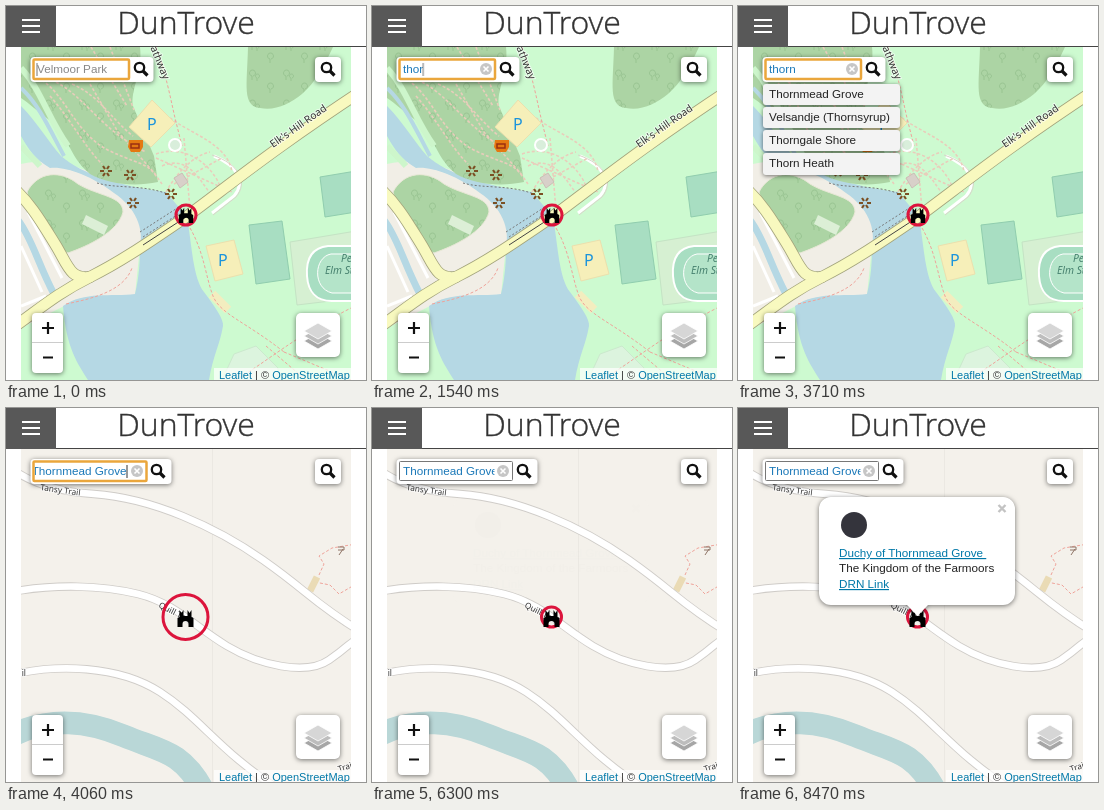
Recreate the animation shown at these times as an HTML page. Size 360 px wide and 374 px high, loop 9.1 s.

```html
<!DOCTYPE html>
<html lang="en">
<head>
<meta charset="utf-8">
<title>Map search</title>
<style>
html, body { margin: 0; width: 100%; height: 100%; overflow: hidden; background: #fff; }
svg { display: block; }
text { font: 11.7px "Liberation Sans", Arial, sans-serif; fill: #222; white-space: pre; }
.title { font: 300 32px "Open Sans", sans-serif; fill: #333; stroke: #333; stroke-width: .4px; }
.label { font: 10.3px "Noto Sans", sans-serif; fill: #333; stroke: #fff; stroke-opacity: .6; stroke-width: 2px; paint-order: stroke; }
.small { font-size: 8.3px; }
.sport { font-style: italic; fill: #46806e; stroke: none; }
.park { font: 16px "Noto Sans", sans-serif; fill: #1b94dc; }
.query { fill: #1a78b8; }
.hint { fill: #888; }
.link { fill: #0078a8; }
.popup .link { text-decoration: underline; }
.credit { font-size: 11px; fill: #333; }
.path, .trail { fill: none; stroke-dasharray: 3 2; }
.path { stroke: #efa39a; }
.trail { stroke: #e9cdbb; stroke-width: 1.6; }
.casing, .road { fill: none; stroke-linecap: round; }
.yellow .casing { stroke: #a3a47c; stroke-width: 12; }
.yellow .road { stroke: #f8f9bf; stroke-width: 10.4; }
.white .casing { stroke: #cfccc8; stroke-width: 8.4; }
.white .road { stroke: #fff; stroke-width: 6.6; }
.box { fill: #fff; filter: drop-shadow(0 1px 2.5px #0008); }
.focus { fill: #fff; stroke: #eaa63c; stroke-width: 2.5; }
.plain { fill: #fff; stroke: #777; }
.ring { fill: none; stroke: #dc143c; stroke-width: 3; }

/* One loop is 9.1 s, so 1% is 91 ms. */
.old, .found, .typing, .choosing, .done, .hint, .cancel, .list, .caret, .cover, .pulse {
  animation: 9.1s step-end infinite;
}
.old, .typing { animation-name: before; }
.found { animation-name: after; }
.choosing { animation-name: chosen; }
.done { animation-name: blurred; }
.hint { animation-name: hint; }
.cancel { animation-name: cancel; }
.list { animation-name: list; }
.caret { animation-name: blink; }
.cover { animation-name: type; }
.pulse { animation-name: pulse; }
.popup { animation: popup 9.1s linear infinite; }

@keyframes before { 0% { opacity: 1 } 42.308%, 100% { opacity: 0 } }
@keyframes after { 0% { opacity: 0 } 42.308%, 100% { opacity: 1 } }
@keyframes chosen { 0% { opacity: 0 } 42.308% { opacity: 1 } 69.231%, 100% { opacity: 0 } }
@keyframes blurred { 0% { opacity: 0 } 69.231%, 100% { opacity: 1 } }
@keyframes hint { 0% { opacity: 1 } 10%, 100% { opacity: 0 } }
@keyframes cancel { 0% { opacity: 0 } 10%, 100% { opacity: 1 } }
@keyframes list { 0% { opacity: 0 } 23.077%, 100% { opacity: 1 } }
@keyframes type {
  0% { transform: translateX(0) }
  10% { transform: translateX(3.3px) }
  12.308% { transform: translateX(9.8px) }
  13.846% { transform: translateX(16.3px) }
  16.154% { transform: translateX(20.2px) }
  18.462%, 100% { transform: translateX(26.7px) }
}
@keyframes blink {
  0%, 9.231%, 29.451%, 41.4%, 52.088%, 63.846% { opacity: 1 }
  4.615%, 23.626%, 35.165%, 46.154%, 57.363%, 69.231%, 100% { opacity: 0 }
}
@keyframes pulse {
  0% { r: 10px }
  44.505% { r: 22.5px }
  46.703% { r: 19px }
  48.901% { r: 14px }
  51.099%, 100% { r: 10px }
}
@keyframes popup { 0%, 69.231% { opacity: 0 } 71.429%, 100% { opacity: 1 } }
</style>
</head>
<body>
<svg width="360" height="374" viewBox="0 0 360 374">
  <defs>
    <clipPath id="map"><path d="M15 41H345V374H15z"/></clipPath>
    <clipPath id="narrow"><path d="M29 55H108V72H29z"/></clipPath>
    <clipPath id="wide"><path d="M29 55H122.500V72H29z"/></clipPath>
    <pattern id="wood" width="34" height="30" patternUnits="userSpaceOnUse">
      <path fill="#acd4a4" d="M0 0H34V30H0z"/>
      <path fill="none" stroke="#98c491" d="M8 14v-4a3 3 0 1 1 1 0M13 15v-3a2 2 0 1 1 1 0M26 27v-4a3 3 0 1 1 1 0"/>
    </pattern>
    <g id="lens" fill="none" stroke="#111">
      <circle cx="-1.500" cy="-1.500" r="4.700" stroke-width="2.300"/>
      <path d="M2 2L6.500 6.500" stroke-width="3.200"/>
    </g>
    <g id="clear">
      <circle r="6" fill="#c6c6c6"/>
      <path d="M-2.500-2.500L2.500 2.500M2.500-2.500L-2.500 2.500" stroke="#fff" stroke-width="1.600"/>
    </g>
    <path id="castle" d="M-8 9V0l2-1V-8l2 3 2-3V-2h4V-8l2 3 2-3V-1l2 1V9H3V6a3 3 0 0 0-6 0V9z"/>
    <path id="star" fill="none" stroke="#7b5024" stroke-width="2.200" d="M-6 0H-2M2 0H6M-3-5L-1-2M3-5L1-2M-3 5L-1 2M3 5L1 2"/>
  </defs>

  <g clip-path="url(#map)">
    <g class="old">
      <path fill="#cdfad0" d="M15 41H345V374H15z"/>
      <path fill="#f1eee6" d="M15 158C50 150 90 165 112 182C134 198 142 222 134 240L129 289 58 300 15 322z"/>
      <path fill="#b5d8e4" d="M15 100C30 115 42 135 55 150C76 168 112 180 160 186L181 211C186 240 187 272 198 286C210 302 218 314 217 320C214 338 207 350 203 374H82C72 358 60 342 57 300C78 285 106 291 129 288C133 272 134 256 134 242C138 222 130 202 108 187C85 169 58 160 44 162C30 154 22 143 15 130z"/>
      <path fill="url(#wood)" d="M15 41H134C137 65 124 85 127 100L148 150 152 176C128 181 102 178 84 168C62 150 62 126 42 113C30 104 24 98 15 92z"/>
      <path fill="none" stroke="#cdf6cb" stroke-width="6" d="M15 62C34 82 42 112 62 140M15 140L34 160"/>
      <path fill="none" stroke="#b5d8e4" stroke-width="4" d="M15 82C34 100 44 124 58 150"/>
      <path fill="url(#wood)" stroke="#e8e8d6" d="M21 186C32 165 55 164 72 178C92 190 117 190 117 206C112 226 82 240 62 247C44 240 28 214 21 186z"/>
      <path fill="#dcefd6" d="M80 209L102 220 98 229 76 218z"/>
      <path fill="url(#wood)" d="M242 41H327C318 60 310 76 296 88C284 98 269 105 254 102C236 100 241 80 242 41z"/>
      <g fill="none">
        <path stroke="#b5d8e4" stroke-width="7" d="M12 214C26 232 32 258 48 288"/>
        <path stroke="#fff" stroke-width="3" d="M15 240L36 286M22 206L56 272M15 300L40 290"/>
        <path stroke="#fff" stroke-width="3" d="M208 150C232 160 240 176 228 190L206 207"/>
        <path stroke="#d9d5cb" d="M206 149C234 158 242 177 230 191L207 209"/>
        <path stroke="#f3edbf" stroke-width="9" d="M206 288L222 304"/>
      </g>
      <path fill="#dcf4de" stroke="#cbe9cd" d="M216 374L228 348 250 340 272 362V374z"/>

      <g class="trail">
        <path d="M36 74C62 92 70 130 106 146S140 155 156 178M50 76C80 92 96 125 140 146M66 78C94 90 104 112 127 130M84 78L112 126 151 170M44 90C66 115 78 140 96 158M85 41L121 100M104 41L128 104"/>
        <path d="M150 148C172 140 196 150 210 172S196 196 184 204M156 160C180 150 190 168 206 190M150 152L226 186M160 186C170 168 186 150 204 146M178 132L184 204M164 112C185 128 222 138 226 166M168 178L216 152"/>
      </g>
      <g class="path">
        <path d="M150 41C160 68 164 90 169 112L176 140M184 222C198 246 200 272 207 290S240 316 278 346M230 374C260 356 290 330 345 302M260 340L300 374M278 346L345 374M60 298C90 292 118 284 126 262"/>
      </g>
      <circle cx="169" cy="139" r="6" fill="#d9eedb" stroke="#fff" stroke-width="2"/>
      <path fill="#d8d0c9" stroke="#cbbfb6" d="M168 172l8-5 6 9-8 6z"/>

      <path fill="#f6efb9" stroke="#ebe0ae" d="M146 94L169 117 145 141 123 121zM200 240L228 234 237 268 209 275z"/>
      <text class="park" x="141" y="124">P</text>
      <text class="park" x="212" y="260">P</text>
      <g fill="#a8dec2" stroke="#90cdae">
        <path d="M243 219L276 215 284 273 250 278z"/>
        <path d="M314 171L350 165 350 206 319 211z"/>
        <path fill="#d6f0d2" stroke="#c4e3c4" d="M284 236L350 225V292L291 299z"/>
        <path stroke="#fff" stroke-width="2" d="M350 240H322C304 242 300 256 301 270S309 296 328 295H350z"/>
        <path fill="#b4e4c9" stroke="#fff" d="M350 248H325C308 251 306 282 326 287H350z"/>
      </g>
      <text class="label sport" x="335" y="256">Pel</text>
      <text class="label sport" x="319" y="268">Elm Sta</text>

      <g class="yellow">
        <path class="casing" d="M5 180C24 196 36 217 49 238S64 274 84 271"/>
        <path class="casing" d="M5 323C35 302 50 288 84 271S146 234 180 211C230 174 266 144 360 82"/>
        <path class="road" d="M5 180C24 196 36 217 49 238S64 274 84 271"/>
        <path class="road" d="M5 323C35 302 50 288 84 271S146 234 180 211C230 174 266 144 360 82"/>
      </g>
      <path stroke="#444" d="M137 239L180 211"/>
      <path fill="none" stroke="#777" stroke-dasharray="2 2" d="M134 226L176 199M137 231L174 207M91 177C111 183 139 178 164 189"/>
      <use href="#star" x="100" y="165"/><use href="#star" x="124" y="169"/>
      <use href="#star" x="127" y="197"/><use href="#star" x="165" y="188"/>
      <path fill="#e47912" d="M123 134h14v7l-3 5h-9l-3-5z"/>
      <path fill="none" stroke="#9a2f12" stroke-width="1.500" d="M125 138h8v4h-8z"/>
      <text class="label" transform="translate(267 142) rotate(-35)">Elk's Hill Road</text>
      <text class="label" transform="translate(142 36) rotate(68)">Pathway</text>
      <circle class="ring" cx="180" cy="209" r="10"/>
      <use href="#castle" transform="translate(180 209) scale(.9)"/>
    </g>

    <g class="found">
      <path fill="#f4f1eb" d="M15 41H345V374H15z"/>
      <path stroke="#ebe8e2" d="M206.500 41V374"/>
      <path fill="none" stroke="#b9d7d7" stroke-width="23" d="M5 328C44 308 82 313 118 328S175 342 197 382"/>
      <g class="path">
        <path d="M313 167L318 156 313 148 326 140 350 136M309 174L324 177 333 186 350 176"/>
      </g>
      <path fill="none" stroke="#eadbb5" stroke-width="7" d="M304 183L311 169"/>
      <path fill="none" stroke="#8f7466" d="M332 139h6v3h-6M333 147l4-6"/>
      <g class="white">
        <path class="casing" d="M5 60C28 78 58 84 88 86C146 90 210 119 257 152S305 193 355 224"/>
        <path class="casing" d="M5 184C48 176 95 177 132 186S189 219 221 238S300 268 323 252S342 235 355 229"/>
        <path class="casing" d="M5 267C50 256 112 257 154 284S213 344 277 384"/>
        <path class="road" d="M5 60C28 78 58 84 88 86C146 90 210 119 257 152S305 193 355 224"/>
        <path class="road" d="M5 184C48 176 95 177 132 186S189 219 221 238S300 268 323 252S342 235 355 229"/>
        <path class="road" d="M5 267C50 256 112 257 154 284S213 344 277 384"/>
      </g>
      <text class="label small" transform="translate(34 82) rotate(8)">Tansy Trail</text>
      <text class="label small" transform="translate(152 199) rotate(27)">Quill Trail</text>
      <text class="label small" x="11" y="268">ail</text>
      <text class="label small" transform="translate(333 364) rotate(-18)">Trail</text>
      <circle class="ring pulse" cx="179.500" cy="209" r="10"/>
      <use href="#castle" transform="translate(179.500 210)"/>
    </g>

    <g class="popup">
      <path class="box" d="M93 89H265a12 12 0 0 1 12 12V185a12 12 0 0 1-12 12H190L179.500 208 169 197H93a12 12 0 0 1-12-12V101a12 12 0 0 1 12-12z"/>
      <circle cx="116" cy="117" r="13" fill="#34343c"/>
      <path d="M260.500 97L267.500 104M267.500 97L260.500 104" stroke="#c3c3c3" stroke-width="2.400"/>
      <text class="link" x="101" y="149">Duchy of Thornmead Grove </text>
      <text x="101" y="164">The Kingdom of the Farmoors</text>
      <text class="link" x="101" y="180">DRN Link</text>
    </g>

    <rect x="208" y="362" width="137" height="12" fill="#fff" fill-opacity=".7"/>
    <text class="credit" x="213" y="373"><tspan class="link">Leaflet</tspan> | © <tspan class="link">OpenStreetMap</tspan></text>
  </g>

  <g class="typing">
    <rect class="box" x="24.500" y="51" width="123" height="25" rx="4"/>
    <rect class="focus" x="27.500" y="53.500" width="95.500" height="19.500" rx="1"/>
    <text class="query" x="31" y="67">thorn</text>
    <g clip-path="url(#narrow)">
      <g class="cover">
        <rect x="31" y="56" width="90" height="15" fill="#fff"/>
        <rect class="caret" x="30.500" y="57" width="1" height="13" fill="#777"/>
      </g>
    </g>
    <text class="hint" x="31" y="67">Velmoor Park</text>
    <g class="cancel"><use href="#clear" x="114" y="63"/></g>
    <use href="#lens" x="135" y="63"/>
    <g class="list">
      <g fill="#f3f3f3" style="filter:drop-shadow(0 1px 2px #0008)">
        <rect x="25" y="78" width="137" height="21" rx="3"/>
        <rect x="25" y="101" width="137" height="21" rx="3"/>
        <rect x="25" y="124" width="137" height="21" rx="3"/>
        <rect x="25" y="147" width="137" height="22" rx="3"/>
      </g>
      <text x="31" y="92">Thornmead Grove</text>
      <text x="31" y="115">Velsandje (Thornsyrup)</text>
      <text x="31" y="138">Thorngale Shore</text>
      <text x="31" y="161">Thorn Heath</text>
    </g>
  </g>

  <g class="found">
    <rect class="box" x="24.500" y="51" width="141" height="25" rx="4"/>
    <g class="choosing">
      <rect class="focus" x="27.500" y="53.500" width="113" height="19.500" rx="1"/>
      <g clip-path="url(#wide)">
        <text class="query" x="120.500" y="67" text-anchor="end">Thornmead Grove</text>
        <rect class="caret" x="120.500" y="57" width="1" height="13" fill="#333"/>
      </g>
    </g>
    <g class="done">
      <rect class="plain" x="27.500" y="53.500" width="113" height="19" rx="1"/>
      <text class="query" x="31" y="67" clip-path="url(#wide)">Thornmead Grove</text>
    </g>
    <use href="#clear" x="131" y="63"/>
    <use href="#lens" x="152" y="63"/>
  </g>

  <rect class="box" x="309" y="51" width="26" height="25" rx="4"/>
  <use href="#lens" x="322" y="63"/>

  <rect class="box" x="26" y="307" width="31" height="60" rx="4"/>
  <path d="M26 336.500H57" stroke="#ccc"/>
  <path d="M36 322H48M42 316V328M37 351.500H47" stroke="#111" stroke-width="2.200"/>

  <rect class="box" x="290" y="307" width="44" height="44" rx="5"/>
  <g stroke="#fff" stroke-width=".8">
    <path fill="#a6a6a6" d="M312 327L326 335 312 343 298 335z"/>
    <path fill="#bdbdbd" d="M312 322L326 330 312 338 298 330z"/>
    <path fill="#d6d6d6" d="M312 317L326 325 312 333 298 325z"/>
  </g>

  <path fill="#fff" d="M0 0H360V40H0z"/>
  <path d="M50 40.500H360" stroke="#444"/>
  <path fill="#585858" d="M0 0H50V41H0z"/>
  <path d="M16 14H34M16 20H34M16 26H34" stroke="#fff" stroke-width="2"/>
  <text class="title" x="180" y="28" text-anchor="middle">DunTrove</text>
</svg>
</body>
</html>
```
